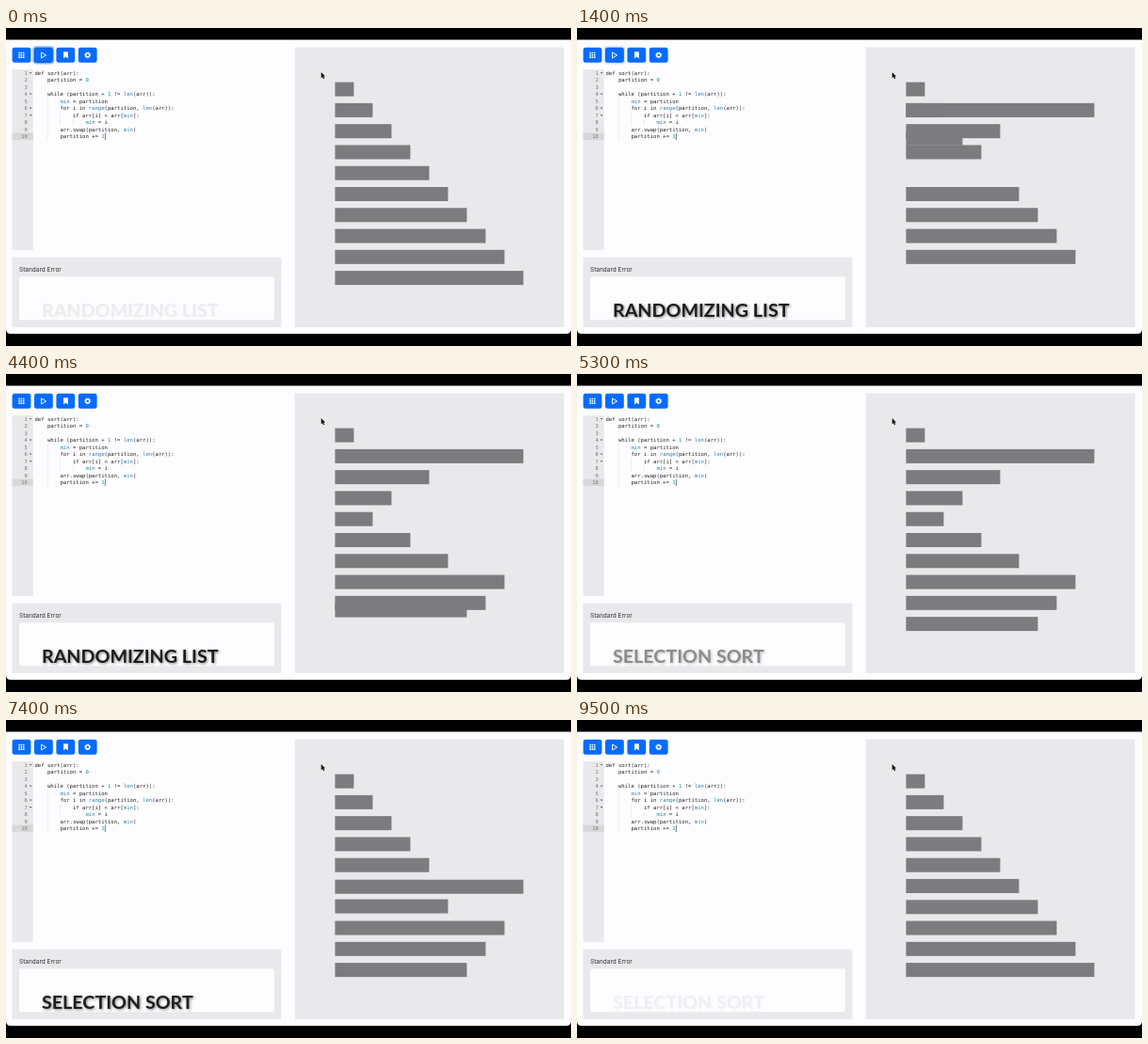
These frames come from a looping animation (600 by 338 pixels, 9.6 s). An HTML page:

```html
<!DOCTYPE html>
<html lang="en">
<head>
<meta charset="utf-8">
<title>Selection sort</title>
<style>
  html, body { margin: 0; width: 100%; height: 100%; overflow: hidden; background: #000; }
  svg { display: block; width: 600px; height: 338px; }
  text { white-space: pre; }
  .code { font: 5.6px "DejaVu Sans Mono", monospace; fill: #26262a; }
  .num { font: 5.4px "DejaVu Sans Mono", monospace; fill: #77777b; text-anchor: end; }
  .fn { fill: #2f84a8; }
  .lit { fill: #16929c; }
  .label { font: 6.5px Inter, Roboto, sans-serif; fill: #303034; }
  .title {
    font: 700 19.7px Lato, "Open Sans", sans-serif; fill: #1d1d1f;
    filter: drop-shadow(1px 1.5px 1.5px rgba(0, 0, 0, .5));
  }
</style>
</head>
<body>
<svg viewBox="0 0 600 338">
  <rect width="600" height="338"/>
  <path d="M0 12.5H600V320q0 5-5 5H5q-5 0-5-5z" fill="#fdfcfe"/>

  <g id="buttons" fill="#066bff"></g>
  <g id="ring" fill="none">
    <rect x="29" y="20" width="21.6" height="17.6" rx="3" stroke="#8fbcff" stroke-width="1.6"/>
    <rect x="30.3" y="21.2" width="19" height="15.2" rx="2" stroke="#0650c4" stroke-width=".9"/>
  </g>
  <g fill="#fff">
    <path id="grid"/>
    <path d="M37.6 25.9v6l5-3z" fill="none" stroke="#fff" stroke-width="1" stroke-linejoin="round"/>
    <path d="M61 25.2h4.8v7.2l-2.4-1.9-2.4 1.9z"/>
  </g>
  <g fill="none" stroke="#fff">
    <circle cx="86.7" cy="28.8" r="2" stroke-width="1.4"/>
    <circle cx="86.7" cy="28.8" r="3" stroke-width="1" stroke-dasharray="1.178"/>
  </g>

  <rect x="6.5" y="44" width="22.3" height="192" fill="#e9e8ea"/>
  <rect x="6.5" y="111.5" width="22.3" height="7.5" fill="#d8d7d9"/>
  <path d="M44.3 74V119M57.7 89V104M71.2 96.5V104" stroke="#dddce0" stroke-width=".5"/>
  <g id="editor"></g>
  <path d="M105.4 111.6V119" stroke="#222" stroke-width=".6"/>

  <rect x="6.5" y="243.7" width="286" height="74.2" fill="#e9e8ea"/>
  <text class="label" x="14" y="258.5">Standard Error</text>
  <rect x="14" y="264.3" width="271" height="46" rx="2" fill="#fdfcfe"/>
  <text class="title" x="38" y="307">RANDOMIZING LIST</text>
  <text class="title" x="38" y="307">SELECTION SORT</text>

  <rect x="306.7" y="20.5" width="285.8" height="297.4" fill="#e9e8ea"/>
  <g id="bars" fill="#7c7b7d"></g>
  <path d="M334.7 47v6.3l1.4-1.3 1 2.3 1.1-.5-1-2.2h1.9z" stroke="#fff" stroke-width=".5" paint-order="stroke"/>
</svg>
<script>
  const LOOP = 9600, STEP = 100, MOVE = 400;
  const byId = id => document.getElementById(id);

  function add(parent, tag, attrs) {
    const el = document.createElementNS('http://www.w3.org/2000/svg', tag);
    for (const key in attrs) el.setAttribute(key, attrs[key]);
    return parent.appendChild(el);
  }

  // Toolbar
  for (let i = 0; i < 4; i++)
    add(byId('buttons'), 'rect', { x: 6.6 + 23.4 * i, y: 20.8, width: 19.8, height: 16, rx: 2.4 });
  let dots = '';
  for (let i = 0; i < 9; i++)
    dots += `M${13.3 + 2.3 * (i % 3)} ${25.7 + 2.3 * Math.floor(i / 3)}h1.6v1.6h-1.6z`;
  byId('grid').setAttribute('d', dots);

  // Editor
  const code = [
    'def sort(arr):',
    '    partition = 0',
    '',
    '    while (partition + 1 != len(arr)):',
    '        min = partition',
    '        for i in range(partition, len(arr)):',
    '            if arr[i] < arr[min]:',
    '                min = i',
    '        arr.swap(partition, min)',
    '        partition += 1'
  ];
  const folds = [0, 3, 5, 6];
  const paint = line => line
    .replace(/</g, '&lt;')
    .replace(/\b(min|len|range)\b/g, '<tspan class="fn">$1</tspan>')
    .replace(/\b(\d)\b/g, '<tspan class="lit">$1</tspan>');
  code.forEach((line, i) => {
    const y = 49.6 + 7.52 * i;
    add(byId('editor'), 'text', { class: 'num', x: 22.8, y }).textContent = i + 1;
    add(byId('editor'), 'text', { class: 'code', x: 30.5, y }).innerHTML = paint(line);
    if (folds.includes(i))
      add(byId('editor'), 'path', { d: `M24.8 ${y - 2.6}h2.6l-1.3 1.6z`, fill: '#55555a' });
  });

  // Each move is [start, bar, slot]; the shuffle sends bars home one at a time.
  const order = [1, 10, 5, 3, 2, 4, 6, 9, 8, 7];
  const starts = [0, 345, 828, 1313, 1830, 2300, 2775, 3255, 3730, 4208];
  const moves = order.map((bar, slot) => [starts[slot], bar, slot]);
  const swaps = [
    [5420, 1, 4], [5910, 2, 3], [6400, 3, 5], [6890, 4, 5],
    [7380, 5, 6], [7880, 6, 9], [8410, 7, 8]
  ];
  for (const [start, a, b] of swaps) {
    moves.push([start, order[a], b], [start, order[b], a]);
    [order[a], order[b]] = [order[b], order[a]];
  }

  const clamp = v => Math.min(1, Math.max(0, v));

  // cubic-bezier(.25, .1, .25, 1)
  function ease(x) {
    if (x <= 0 || x >= 1) return clamp(x);
    let lo = 0, hi = 1;
    for (let i = 0; i < 24; i++) {
      const u = (lo + hi) / 2;
      if (.75 * u * (1 - u) + u ** 3 < x) lo = u; else hi = u;
    }
    return .3 * lo * (1 - lo) ** 2 + 3 * lo * lo * (1 - lo) + lo ** 3;
  }

  const slotY = slot => 57.6 + 22.28 * slot;
  const bars = order.map((_, i) =>
    add(byId('bars'), 'rect', { x: 349.4, width: 20 * (i + 1), height: 15 }));
  const titles = document.querySelectorAll('.title');
  const fade = (t, from, to) => clamp((t - from) / (to - from));

  function draw(t) {
    const slots = bars.map((_, i) => i);
    for (const [start, bar, slot] of moves)
      slots[bar - 1] += (slot - slots[bar - 1]) * ease((t - start) / MOVE);
    bars.forEach((el, i) => el.setAttribute('y', slotY(slots[i]).toFixed(2)));

    titles[0].style.opacity = fade(t, -45, 600) * (1 - fade(t, 4450, 5000));
    titles[1].style.opacity = fade(t, 5000, 5600) * (1 - fade(t, 8900, 9535));
    byId('ring').style.opacity = 1 - .6 * fade(t, 0, 1400) - .4 * fade(t, 1400, 4300);
  }

  const begin = performance.now();
  function tick() {
    const t = (performance.now() - begin) % LOOP;
    draw(Math.floor(t / STEP) * STEP);
    requestAnimationFrame(tick);
  }
  tick();
</script>
</body>
</html>
```
